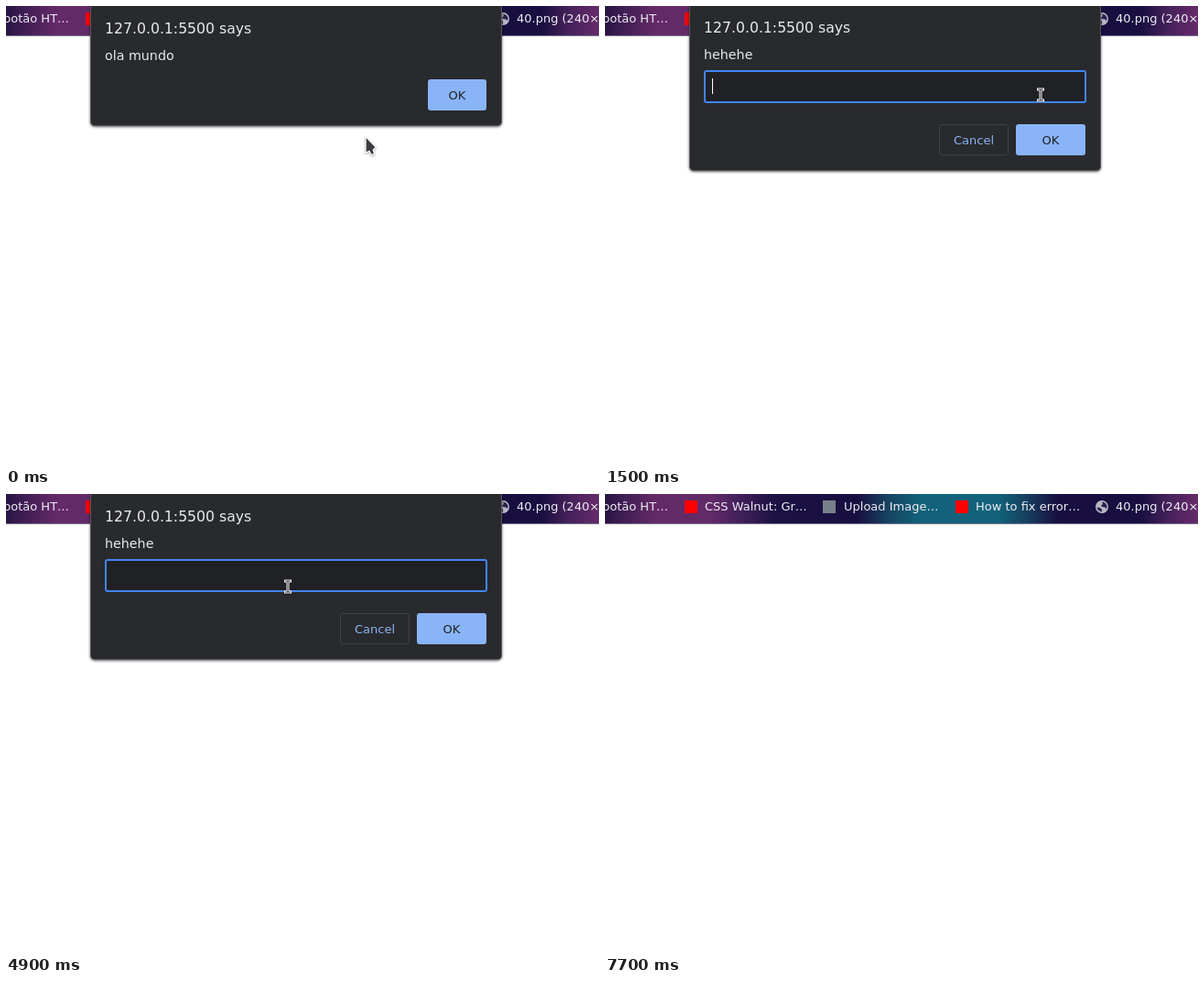
Write an HTML page that moves like this. It is 648 px wide and 502 px high and loops after 8600 ms.

```html
<!DOCTYPE html>
<html lang="en">
<head>
<meta charset="utf-8">
<title>Browser dialogs</title>
<style>
html, body { margin: 0; width: 100%; height: 100%; overflow: hidden; background: #fff; }
#stage {
  position: relative; width: 648px; height: 502px; overflow: hidden; background: #fff;
  font: 13px/15px "DejaVu Sans", Verdana, sans-serif; white-space: nowrap; cursor: default;
}
#stage * { position: absolute; box-sizing: border-box; }
#bar {
  left: 0; top: 0; width: 648px; height: 33px; color: #eeecf3;
  border-bottom: 1px solid #77748a;
  background: linear-gradient(90deg, #27143f 0, #3a1b50 14px, #632a68 55px, #632a68 115px,
    #41205a 148px, #1b1142 185px, #180f40 275px, #164461 310px, #11627a 345px, #11627a 430px,
    #16405f 460px, #180f40 495px, #180f40 585px, #45215a 615px, #632a68 645px);
}
#bar span { top: 6px; }
#bar i { top: 7px; width: 14px; height: 14px; }
.red { background: #f00; }
.grey { background: #77808a; }
#globe { left: 536px; top: 7px; }

#dialog {
  left: 92px; top: 0; width: 450px; height: 131px; display: none;
  background: #292a2d; color: #e8eaed;
  border: 1px solid #55565a; border-top: 0; border-radius: 0 0 5px 5px;
  box-shadow: 0 1px 3px rgba(0, 0, 0, .65);
}
#dialog.alert, #dialog.prompt { display: block; }
#dialog.prompt { height: 181px; }
#title { left: 15px; top: 15px; font-size: 15.7px; line-height: 19px; }
#label { left: 15px; top: 46px; font-size: 14.25px; line-height: 16px; }
.button {
  height: 34px; border-radius: 3px; line-height: 35px; text-align: center;
  background: #8ab4f8; color: #202124;
}
#ok { left: 368px; top: 80px; width: 64px; }
.prompt #ok { left: 356px; top: 130px; width: 76px; }
#ok.hover { background: #82abef; }
#ok.pressed {
  background: #82a7e4; box-shadow: inset 0 0 0 2px #202124;
  outline: 2px solid #4285f4; outline-offset: -1px;
}
#cancel {
  left: 272px; top: 130px; width: 76px; line-height: 33px;
  background: none; color: #8ab4f8; border: 1px solid #3f4145;
}
#field {
  left: 15px; top: 71px; width: 418px; height: 36px;
  background: #202124; border: 2px solid #4285f4; border-radius: 3px;
}
#field.idle { left: 16px; top: 72px; width: 416px; height: 34px; border: 1px solid #424347; }
#typed { left: 23px; top: 81px; }
#caret { left: 24px; top: 80px; width: 1px; height: 17px; background: #fff; }
.alert #cancel, .alert #field, .alert #typed, .alert #caret { display: none; }
#pointer { left: 0; top: 0; overflow: visible; filter: drop-shadow(0 1px 1px rgba(0, 0, 0, .35)); }
</style>
</head>
<body>
<div id="stage">
  <div id="bar">
    <span style="left:-3px">botão HT…</span>
    <i class="red" style="left:87px"></i><span style="left:109px">CSS Walnut: Gr…</span>
    <i class="grey" style="left:238px"></i><span style="left:261px">Upload Image…</span>
    <i class="red" style="left:383px"></i><span style="left:405px">How to fix error…</span>
    <svg id="globe" width="14" height="14">
      <circle cx="7" cy="7" r="7" fill="#b9b7c3"/>
      <path d="M1.5 7.5L5 8 7 10V12.6Q2 11.5 1.5 7.5ZM7 1.5Q11 2 12.4 5.5L12.3 9 10 7.5 7 7 6 5.5 8 4Z" fill="#2a2250"/>
    </svg>
    <span style="left:558px">40.png (240×</span>
  </div>
  <div id="dialog">
    <span id="title">127.0.0.1:5500 says</span>
    <span id="label"></span>
    <div id="field"></div>
    <span id="typed"></span>
    <div id="caret"></div>
    <div id="cancel" class="button">Cancel</div>
    <div id="ok" class="button">OK</div>
  </div>
  <svg id="pointer" width="1" height="1">
    <path id="arrow" d="M1 .7V18.3L5 16.2 7.4 20.6 10.6 19.2 9.2 15 12.2 12.2Z" fill="#3b3c3f" stroke="#fff" stroke-width="1.2"/>
    <g id="beam" fill="none">
      <path d="M-4 -6H4M0 -6V6M-4 6H4" stroke="#fff" stroke-width="3"/>
      <path d="M-3 -6H3M0 -6V6M-3 6H3" stroke="#222326"/>
    </g>
  </svg>
</div>
<script>
const LOOP = 8600;
const $ = id => document.getElementById(id);
const dialog = $('dialog'), ok = $('ok'), caret = $('caret'), pointer = $('pointer');

// Each row: start time in ms, then the values held until the next row.
const moves = [
  [0, 392, 142], [100, 417, 135], [200, 446, 118], [300, 465, 100],
  [500, 468, 99], [600, 472, 97], [700, 474, 96],
  [1500, 476, 97, 'beam'], [2400, 469, 98, 'beam'], [2500, 430, 103, 'beam'],
  [2600, 381, 126], [2700, 346, 138], [2800, 339, 140], [2900, 335, 139],
  [3000, 331, 137], [3100, 327, 134], [3200, 323, 130], [3300, 321, 127],
  [3400, 318, 121], [3500, 315, 114], [3600, 312, 108],
  [3700, 310, 104, 'beam'], [3800, 309, 102, 'beam'], [3900, 308, 101, 'beam'],
  [6100, 306, 100], [7400, 285, 78], [7500, 211, 44], [7600, 85, 2], [7700, 60, -60]
];
const tilt = 'translateY(-6px) scaleY(1.012) perspective(1000px) rotateX(4deg)';
const windows = [
  [0, 'alert', 'none', 1], [1400, 'prompt', tilt, .95],
  [1500, 'prompt', 'translateY(-1px)', 1], [1600, 'prompt', 'none', 1],
  [6100, 'prompt', tilt, .97], [6200, '', 'none', 1]
];
const presses = [[0, ''], [500, 'hover'], [1200, 'pressed'], [1400, '']];

const at = (track, t) => track.findLast(row => row[0] <= t);

function draw(t) {
  const [, kind, transform, opacity] = at(windows, t);
  dialog.className = kind;
  dialog.style.transform = transform;
  dialog.style.opacity = opacity;
  $('label').textContent = kind === 'alert' ? 'ola mundo' : 'hehehe';
  ok.className = 'button ' + at(presses, t)[1];

  const count = Math.max(0, Math.min(4, Math.floor((t - 5300) / 100)));
  const closing = t >= 6100;
  const lit = count > 0 || t < 1900 || (t - 1900) % 1000 >= 500;
  $('typed').textContent = 'hehe'.slice(0, count);
  $('field').className = closing ? 'idle' : '';
  caret.style.left = 24 + 8 * count + 'px';
  caret.style.visibility = lit && !closing ? 'visible' : 'hidden';

  const [, x, y, shape = 'arrow'] = at(moves, t);
  pointer.style.transform = `translate(${x}px, ${y}px)`;
  for (const id of ['arrow', 'beam']) $(id).style.display = id === shape ? '' : 'none';
}

const start = performance.now();
function tick() {
  draw((performance.now() - start) % LOOP);
  requestAnimationFrame(tick);
}
tick();
</script>
</body>
</html>
```
